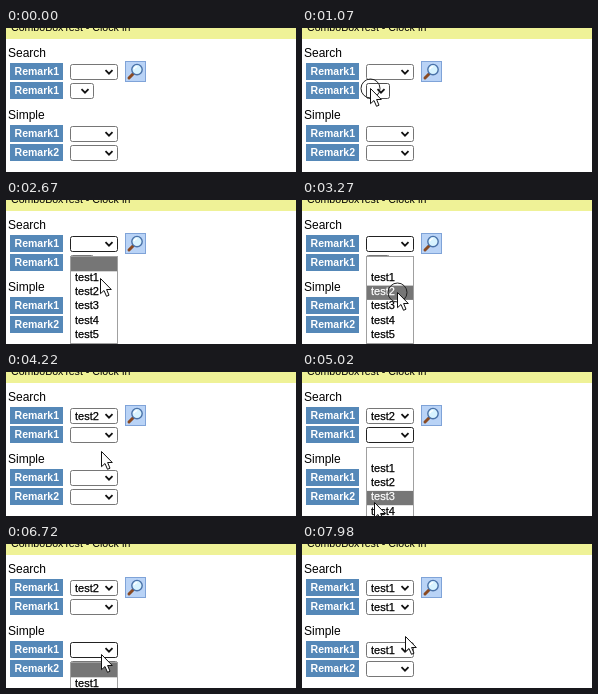
Write an HTML page that moves like this. It is 290 by 144 pixels and loops after 8 s.

```html
<!DOCTYPE html>
<html lang="en">
<head>
<meta charset="utf-8">
<title>Combo boxes</title>
<style>
  html, body { margin: 0; width: 100%; height: 100%; overflow: hidden; background: #fff; }
  svg { display: block; width: 290px; height: 144px; font-family: "Liberation Sans", Arial, sans-serif; }
  text { white-space: pre; }
  .item { font-size: 11px; stroke-width: .25px; }
  .title { font-size: 12px; }
  .badge { font-size: 10.5px; font-weight: bold; fill: #fff; text-anchor: middle; }
</style>
</head>
<body>
<svg id="stage" viewBox="0 0 290 144"></svg>
<script>
const LOOP = 8000, STEP = 70, REPLY = 110, HOVER_LAG = 45;
const LEFT = 64, ROW = 14.3;
const ITEMS = ['', 'test1', 'test2', 'test3', 'test4', 'test5'];
const stage = document.getElementById('stage');

function add(tag, attrs, parent = stage, label) {
  const el = document.createElementNS('http://www.w3.org/2000/svg', tag);
  set(el, attrs);
  if (label) el.textContent = label;
  parent.appendChild(el);
  return el;
}
function set(el, attrs) {
  for (const key in attrs) el.setAttribute(key, attrs[key]);
}
const show = (el, on) => set(el, { display: on ? 'inline' : 'none' });

// Page: two groups of two rows
add('rect', { width: 290, height: 11, fill: '#eff297' });
add('text', { x: 5, y: 3, 'font-size': 10.6 }, stage, 'ComboBoxTest - Clock In');

const combos = [];
['Search', 'Simple'].forEach((title, group) => {
  const top = 36 + 62 * group;
  add('text', { x: 2, y: top - 7.4, class: 'title' }, stage, title);
  for (const y of [top, top + 19]) addRow(y, y > 100 ? 'Remark2' : 'Remark1');
});

function addRow(y, label) {
  add('rect', { x: 4, y: y - 1, width: 53, height: 17, fill: '#5588b8' });
  add('text', { x: 30.8, y: y + 11, class: 'badge' }, stage, label);
  const g = add('g', { transform: `translate(${LEFT} ${y})` });
  combos.push({
    y,
    box: add('rect', { x: .5, y: .5, height: 15, rx: 2, fill: '#fff' }, g),
    value: add('text', { x: 5, y: 12, class: 'item', stroke: '#000' }, g),
    arrow: add('path', { d: 'M-3.5 6.2L0 9.7L3.5 6.2', fill: 'none', stroke: '#111', 'stroke-width': 1.8 }, g)
  });
}

function searchButton() {
  const g = add('g', { transform: 'translate(119 33)' });
  add('rect', { x: .5, y: .5, width: 20, height: 20, fill: '#b9d3f6', stroke: '#7fa3d8' }, g);
  add('path', { d: 'M8.2 12.8L4 17', stroke: '#8a4a22', 'stroke-width': 3, 'stroke-linecap': 'round' }, g);
  add('circle', { cx: 12, cy: 8.6, r: 5.2, fill: '#d8f3ff', stroke: '#4a72a8', 'stroke-width': 1.4 }, g);
  add('path', { d: 'M9 8.2Q9.6 5.8 12.2 5.6', fill: 'none', stroke: '#fff', 'stroke-width': 1.4 }, g);
}
searchButton();

// Drop-down list
const list = add('g', {});
const frame = add('rect', { x: .5, y: .5, fill: '#fff', stroke: '#a0a0a0' }, list);
const mark = add('rect', { x: 1, height: ROW, fill: '#767676' }, list);
const options = ITEMS.map((label, i) =>
  add('text', { x: 5, y: Math.round(ROW * i + 10.4), class: 'item' }, list, label));

// Pointer
const ring = add('circle', { r: 9.5, fill: 'none', stroke: '#222' });
const pointer = add('path', {
  d: 'M.5 .5V15.7L4 12.5L6.5 18.3L9 17.2L6.6 11.5H11.3Z',
  fill: '#fff', stroke: '#111', 'stroke-linejoin': 'round'
});

// Page state is the fold of all events up to a time
const events = [], moves = [], clicks = [];
const stateAt = t => events.reduce((s, e) => (t >= e.at && e.apply(s), s),
  { open: -1, loaded: false, values: ['', '', '', ''] });
const on = (at, apply) => events.push({ at, apply });

const listTop = i => combos[i].y + 20;
const rowAt = (i, y) => Math.floor((y - listTop(i) - 1) / ROW);
const rowCount = (i, s) => i === 1 && !s.loaded ? 1 : ITEMS.length;
const widthOf = (i, s) => i === 1 && !s.loaded ? 24 : 48;
const comboAt = y => combos.findIndex(c => y >= c.y && y < c.y + 16);

let hand = { x: 140, y: 150 };

// Longer ways take longer unless a duration is given
function move(end, x, y, duration = 50 + 3 * Math.hypot(x - hand.x, y - hand.y)) {
  moves.push({ start: end - duration, steps: 1 + Math.round(duration / STEP), duration, from: hand, to: { x, y } });
  hand = { x, y };
}

// Opens the combo under the pointer, or picks from the open list
function click(t) {
  const { y } = hand;
  clicks.push(t);
  on(t + REPLY, s => {
    if (s.open < 0) {
      s.open = comboAt(y);
    } else {
      s.values[s.open] = ITEMS[rowAt(s.open, y)];
      s.open = -1;
    }
  });
}

move(920, 68, 60);
click(1070);
move(1480, 73, 65);
on(1880, s => { s.open = -1; });
move(2270, 92, 43);
click(2320);
move(2670, 94, 78);
move(2820, 95, 92);
click(3245);
on(3590, s => { s.loaded = true; });
move(4310, 95, 66, 90);
click(4380);
move(4970, 72, 130);
move(5400, 78, 84);
click(5450);
move(5900, 66, 99);
move(6060, 130, 116, 60);
move(6480, 95, 110);
click(6560);
move(7050, 91, 138);
click(7570);
on(7830, s => { s.values[0] = s.values[1] = s.values[2]; });
move(7980, 103, 92, 0);

function pointerAt(t) {
  const m = moves.filter(m => t >= m.start).pop();
  if (!m) return hand;
  const { start, steps, duration, from, to } = m;
  const done = duration ? Math.floor((t - start) / duration * (steps - 1) + 1e-6) : 0;
  const p = Math.min(1, (1 + done) / steps);
  return { x: Math.round(from.x + (to.x - from.x) * p), y: Math.round(from.y + (to.y - from.y) * p) };
}

function drawCombo(c, i, s, p) {
  const width = widthOf(i, s);
  const hover = comboAt(p.y) === i && p.x >= LEFT && p.x < LEFT + width;
  set(c.box, { width: width - 1, stroke: s.open === i ? '#222' : hover ? '#4f4f4f' : '#767676' });
  set(c.arrow, { transform: `translate(${width - 9} 0)` });
  c.value.textContent = s.values[i];
}

function drawList(s, p) {
  const i = s.open;
  show(list, i >= 0);
  if (i < 0) return;
  const rows = rowCount(i, s), width = widthOf(i, s), over = rowAt(i, p.y);
  const active = over >= 0 && over < rows ? over : 0;
  set(list, { transform: `translate(${LEFT} ${listTop(i)})` });
  set(frame, { width: width - 1, height: Math.round(rows * ROW) + 1 });
  set(mark, { y: 1 + active * ROW, width: width - 2 });
  options.forEach((el, k) => {
    const color = k === active ? '#fff' : '#000';
    set(el, { fill: color, stroke: color });
    show(el, k < rows);
  });
}

function draw(t) {
  const s = stateAt(t), p = pointerAt(t);
  combos.forEach((c, i) => drawCombo(c, i, s, p));
  drawList(s, pointerAt(t - HOVER_LAG));
  show(pointer, t >= moves[0].start);
  set(pointer, { transform: `translate(${p.x} ${p.y})` });
  show(ring, clicks.some(at => t >= at && t < at + REPLY));
  set(ring, { cx: p.x + .5, cy: p.y + .5 });
}

const began = performance.now();
function tick() {
  draw((performance.now() - began) % LOOP);
  requestAnimationFrame(tick);
}
tick();
</script>
</body>
</html>
```
